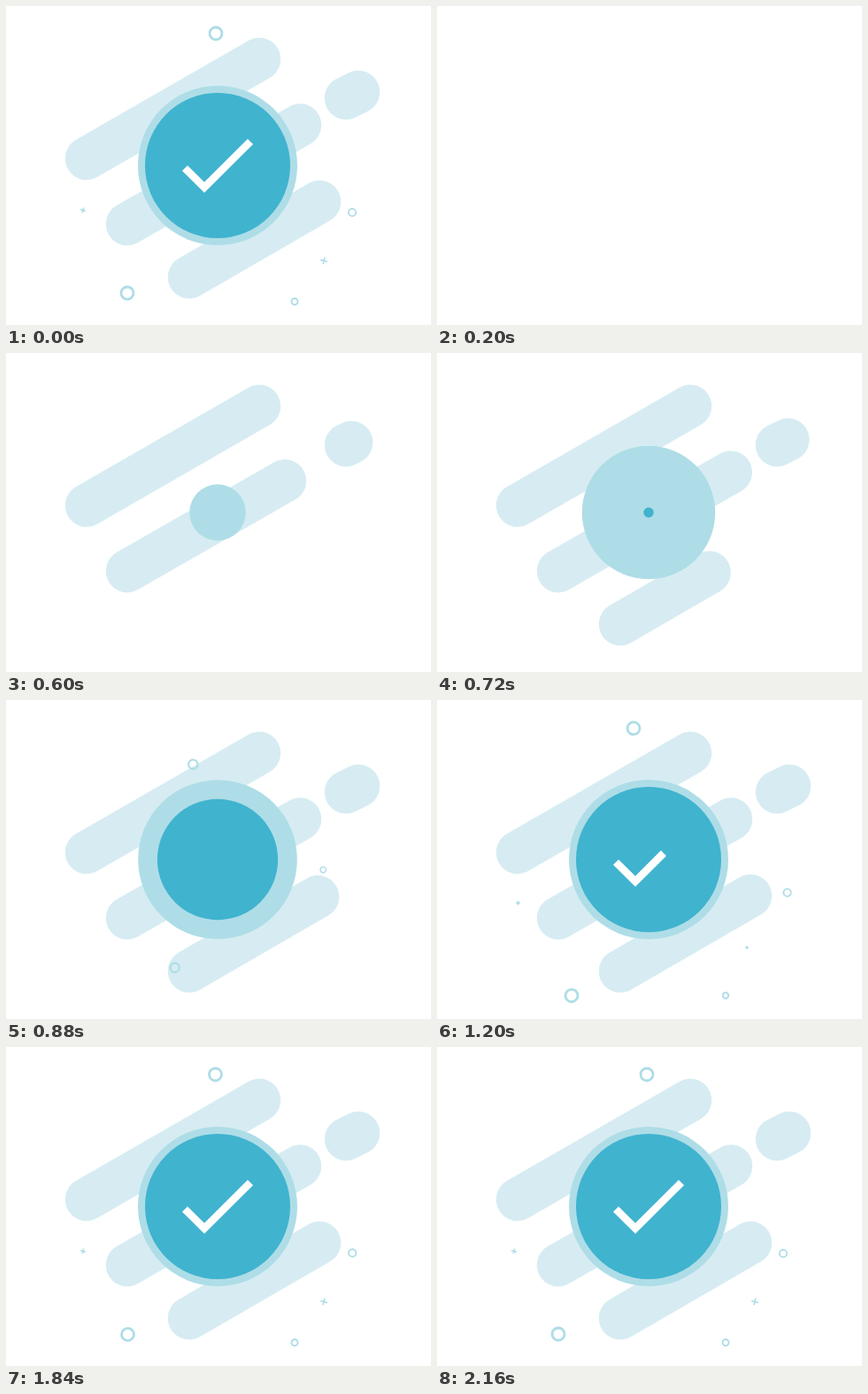
Write an HTML page with a canvas that moves like this. It is 480 by 360 pixels and loops after 2.2 s.

```html
<!DOCTYPE html>
<html lang="en">
<head>
<meta charset="utf-8">
<title>Success check</title>
<style>
  html, body { margin: 0; width: 100%; height: 100%; overflow: hidden; background: #fff; }
  canvas { display: block; }
</style>
</head>
<body>
<canvas id="stage" width="480" height="360"></canvas>
<script>
const ctx = document.getElementById('stage').getContext('2d');
const LOOP = 2200, STEP = 40, HOLD = 200, END = 2160;
const CX = 239, CY = 180;
const PALE = '#d6ecf2', LIGHT = '#aedde7', TEAL = '#40b3cf';

// x1, y1, x2, y2, start time
const bars = [
  [91, 172, 286, 60, 245],
  [137, 246, 332, 134.5, 400],
  [384, 104, 398, 97, 537],
  [207, 306, 354, 221, 605]
];
// offset from centre, radius, line width
const rings = [
  [-2, -149, 7, 2.8],
  [-102, 144, 7, 2.8],
  [152, 53, 4.2, 1.8]
];
// offset from centre, arm length, start time, leave time
const pluses = [
  [-152, 50.5, 3, 1060, Infinity],
  [120, 107.5, 4, 1140, Infinity],
  [126, -163, 3, 1235, 1680]
];

const clamp = v => Math.max(0, Math.min(1, v));
const easeOut = (t, start, duration = 360) => 1 - (1 - clamp((t - start) / duration)) ** 3;

function stroke(color, width) {
  ctx.strokeStyle = color;
  ctx.lineWidth = width;
  ctx.stroke();
}

function disc(radius, color) {
  ctx.beginPath();
  ctx.arc(0, 0, radius, 0, 2 * Math.PI);
  ctx.fillStyle = color;
  ctx.fill();
}

function ring(x, y, radius, width) {
  ctx.beginPath();
  ctx.arc(x, y, radius, 0, 2 * Math.PI);
  stroke(LIGHT, width);
}

function drawBar([x1, y1, x2, y2, start], t) {
  const p = easeOut(t, start);
  if (!p) return;
  ctx.beginPath();
  ctx.moveTo(x1, y1);
  ctx.lineTo(x1 + (x2 - x1) * p, y1 + (y2 - y1) * p);
  ctx.lineCap = 'round';
  stroke(PALE, 48.5);
  ctx.lineCap = 'butt';
}

function drawPlus([x, y, arm, start, leave], t, tilt) {
  const p = easeOut(t, start);
  const size = arm * p * (1 - clamp((t - leave) / 160));
  if (!size) return;
  const reach = 0.87 + 0.13 * p;
  ctx.save();
  ctx.translate(x * reach, y * reach);
  ctx.rotate(tilt);
  ctx.beginPath();
  ctx.moveTo(-size, 0);
  ctx.lineTo(size, 0);
  ctx.moveTo(0, -size);
  ctx.lineTo(0, size);
  stroke(LIGHT, 1.7);
  ctx.restore();
}

function drawCheck(p) {
  if (!p) return;
  const short = Math.hypot(22, 21.7), long = Math.hypot(52, 51.7);
  ctx.beginPath();
  ctx.moveTo(-37, 3);
  ctx.lineTo(-15, 24.7);
  ctx.lineTo(37, -27);
  ctx.setLineDash([(short + long) * p, 200]);
  stroke('#fff', 8.6);
  ctx.setLineDash([]);
}

function draw(t) {
  ctx.fillStyle = '#fff';
  ctx.fillRect(0, 0, 480, 360);
  bars.forEach(bar => drawBar(bar, t));

  ctx.save();
  ctx.translate(CX, CY);
  const lag = 13.7 * ((END - t) / 1280) ** 3 * Math.PI / 180;
  const spread = easeOut(t, 742, 378);
  if (spread) {
    ctx.save();
    ctx.rotate(-lag);
    ctx.scale(spread, spread);
    rings.forEach(r => ring(...r));
    ctx.restore();
  }
  const pop = easeOut(t, 1000);
  if (pop) ring(87, 153.5, 3.5 * pop, 1.9);
  pluses.forEach(plus => drawPlus(plus, t, 0.26 - lag * 4));

  disc(90 * easeOut(t, 549, 378), LIGHT);
  disc(82 * easeOut(t, 711, 378), TEAL);
  drawCheck(easeOut(t, 1073));
  ctx.restore();
}

function frame(now) {
  const t = Math.floor(now % LOOP / STEP) * STEP;
  draw(t < HOLD ? END : t);
  requestAnimationFrame(frame);
}
requestAnimationFrame(frame);
</script>
</body>
</html>
```
